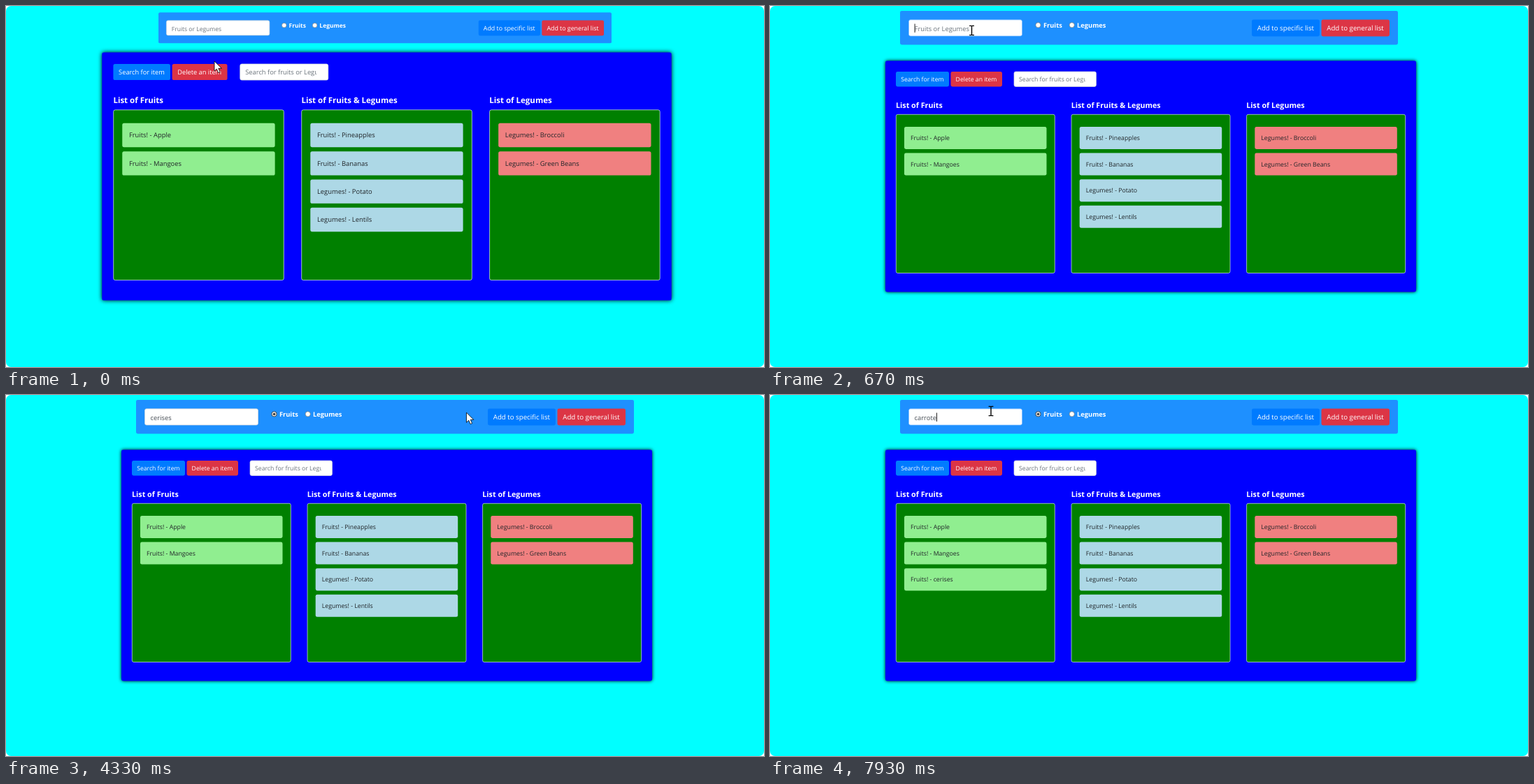
An HTML page for the animation above (8 s loop, 1084 by 517 pixels).

```html
<!DOCTYPE html>
<html lang="en">
<head>
<meta charset="utf-8">
<title>Fruit and legume lists</title>
<style>
  html, body { margin: 0; width: 100%; height: 100%; overflow: hidden; background: #fff; }
  svg { display: block; width: 100vw; height: 100vh; }
  text { font-family: "Open Sans", "Noto Sans", sans-serif; text-rendering: geometricPrecision; white-space: pre; }
</style>
</head>
<body>
<svg id="stage" viewBox="0 0 1084 517">
  <defs>
    <filter id="blur" x="-10%" y="-10%" width="120%" height="120%"><feGaussianBlur stdDeviation="2.9"/></filter>
    <clipPath id="searchClip"><rect x="349" y="94" width="102" height="22"/></clipPath>
  </defs>
  <rect width="1084" height="517" rx="7" fill="#0ff"/>
  <g id="bar"></g>
  <g id="panel"></g>
  <g id="cursor">
    <path id="arrow" d="M0 0V14.2L3.3 11.2L5.7 16.6L8.1 15.5L5.8 10.3H10.3Z" fill="#fff" stroke="#000" stroke-width=".8"/>
    <path id="beam" d="M-3.4-6.6H-.9L0-6L.9-6.6H3.4M0-6V6M-3.4 6.6H-.9L0 6L.9 6.6H3.4" fill="none" stroke="#000" stroke-width="1.4"/>
    <path id="hand" d="M-1.4 1.2Q0-1 1.4 1.2V6L3.3 6.2L5.2 6.8L7 8V12L5.6 17H-2L-5.6 10.6Q-5-0 -4 8.6L-1.4 10.8Z" fill="#fff" stroke="#000" stroke-width=".9" stroke-linejoin="round"/>
  </g>
</svg>
<script>
const LOOP = 8000, FRAME = 200 / 3;
const $ = id => document.getElementById(id);

function add(parent, tag, attrs, content = '') {
  const el = document.createElementNS('http://www.w3.org/2000/svg', tag);
  for (const name in attrs) el.setAttribute(name, attrs[name]);
  el.textContent = content;
  parent.append(el);
  return el;
}
const box = (parent, x, y, width, height, fill, extra) =>
  add(parent, 'rect', { x, y, width, height, fill, rx: 2.4, ...extra });
const label = (parent, x, y, size, content, fill = '#fff', extra) =>
  add(parent, 'text', { x, y, 'font-size': size, fill, ...extra }, content);

const BLUE = '#007bff', RED = '#dc3545', HINT = '#6c757d';
const bold = { 'font-weight': 700 };
const fieldEdge = { stroke: '#ced4da', 'stroke-width': .7 };

// Entry bar
const bar = $('bar');
box(bar, 186, 7, 712, 48.5, '#1e90ff');
const field = box(bar, 198.5, 19.8, 162, 23.2, '#fff', fieldEdge);
const hint = label(bar, 206.6, 36, 9.4, 'Fruits or Legumes', HINT);
const entry = label(bar, 206.6, 36, 9.4, '', '#495057');
const caret = add(bar, 'rect', { y: 25.5, width: 1, height: 12.5, fill: '#222' });
const radio = (x, name) => {
  label(bar, x + 7.4, 30.8, 9.3, name, '#fff', bold);
  return add(bar, 'circle', { cx: x, cy: 27.3, r: 3.6, fill: '#fff', stroke: '#767676', 'stroke-width': .7 });
};
const fruitRadio = radio(383.5, 'Fruits');
radio(431.7, 'Legumes');
const dot = add(bar, 'circle', { cx: 383.5, cy: 27.3, r: 1.9, fill: '#444' });
const addButton = box(bar, 689, 19.5, 97, 24, BLUE);
label(bar, 696.8, 35, 9.7, 'Add to specific list');
box(bar, 788.5, 19.5, 97.5, 24, RED);
label(bar, 796.3, 35, 9.7, 'Add to general list');

// List panel
const panel = $('panel');
box(panel, 165, 78.5, 759, 331, '#000', { filter: 'url(#blur)' });
box(panel, 165, 78.5, 759, 331, '#00f');
box(panel, 180, 94, 76, 21.5, BLUE);
label(panel, 187.2, 108, 8.65, 'Search for item');
box(panel, 258.5, 94, 73.5, 21.5, RED);
label(panel, 265.6, 108, 8.65, 'Delete an item');
box(panel, 349, 94, 117.5, 21.5, '#fff', fieldEdge);
label(panel, 356, 108.3, 8.7, 'Search for fruits or Legumes', HINT, { 'clip-path': 'url(#searchClip)' });

function column(x, title, fill, items) {
  label(panel, x, 146, 10.72, title, '#fff', bold);
  box(panel, x + .3, 155.3, 227, 227.2, '#008000', { stroke: '#e4f2e4', 'stroke-width': .65 });
  return items.map((name, i) => {
    const item = add(panel, 'g', {}), y = 173 + 37.6 * i;
    box(item, x + 12, y, 203.5, 32, fill);
    label(item, x + 21, y + 19.2, 8.75, name, '#212529');
    return item;
  });
}
const fruits = column(180, 'List of Fruits', '#90ee90',
  ['Fruits! - Apple', 'Fruits! - Mangoes', 'Fruits! - cerises']);
column(430.7, 'List of Fruits & Legumes', '#add8e6',
  ['Fruits! - Pineapples', 'Fruits! - Bananas', 'Legumes! - Potato', 'Legumes! - Lentils']);
column(681.3, 'List of Legumes', '#f08080', ['Legumes! - Broccoli', 'Legumes! - Green Beans']);

// Timeline, in ms
const SUBMIT = 4870, REFOCUS = 6130;
const words = [
  { word: 'cerises', keys: [1200, 1400, 1600, 2470, 2530, 2730, 2870], end: SUBMIT },
  { word: 'carrote', keys: [7000, 7130, 7200, 7330, 7530, 7870, 7930], end: LOOP }
];
const caretOn = [[470, 1000], [1200, 2130], [2470, 3400], [REFOCUS, 6670], [7000, LOOP]];
const pointer = [
  [0, 298, 79, 'arrow'], [70, 296, 64, 'arrow'], [130, 291, 45, 'arrow'], [200, 289, 33, 'beam'],
  [330, 288.5, 34.5, 'beam'], [470, 288.5, 35, 'beam'], [3200, 288.5, 35, 'beam'],
  [3270, 302, 37, 'beam'], [3330, 335, 44, 'arrow'], [3400, 372, 38, 'arrow'],
  [3530, 409, 27, 'arrow'], [3600, 401, 26, 'arrow'], [4000, 401, 26, 'arrow'],
  [4130, 480, 16, 'arrow'], [4270, 610, 20, 'arrow'], [4400, 715, 31, 'hand'],
  [4470, 728, 36, 'hand'], [5330, 728, 36, 'hand'], [5400, 700, 41, 'hand'],
  [5470, 590, 42, 'arrow'], [5600, 380, 41, 'arrow'], [5730, 380, 41, 'arrow'],
  [5870, 350, 32, 'beam'], [6000, 325, 20, 'beam'], [6130, 316, 22, 'beam'],
  [6400, 316, 23, 'beam'], [LOOP, 316, 23, 'beam']
];

const within = (t, from, to) => t >= from && t < to;
const show = (el, on) => el.setAttribute('visibility', on ? 'visible' : 'hidden');

// CSS "ease": cubic-bezier(.25, .1, .25, 1)
function ease(x) {
  if (x <= 0 || x >= 1) return Math.max(0, Math.min(1, x));
  const curve = (s, a, b) => 3 * a * s * (1 - s) ** 2 + 3 * b * s * s * (1 - s) + s ** 3;
  let low = 0, high = 1;
  for (let i = 0; i < 20; i++) {
    const mid = (low + high) / 2;
    if (curve(mid, .25, .25) < x) low = mid; else high = mid;
  }
  return curve(low, .1, 1);
}

const zoom = (el, cx, cy, scale) =>
  el.setAttribute('transform', `translate(${cx} ${cy}) scale(${scale}) translate(${-cx} ${-cy})`);

function movePointer(t) {
  const i = Math.max(1, pointer.findIndex(p => p[0] > t));
  const [t0, x0, y0, kind] = pointer[i - 1], [t1, x1, y1] = pointer[i];
  const k = (t - t0) / (t1 - t0);
  $('cursor').setAttribute('transform', `translate(${x0 + (x1 - x0) * k} ${y0 + (y1 - y0) * k})`);
  for (const name of ['arrow', 'beam', 'hand']) show($(name), name === kind);
}

function render(time) {
  const t = Math.round(Math.floor((time + 4) / FRAME) * FRAME / 10) * 10;

  zoom(bar, 542, 31.25, .91 + .09 * ease((t - 128) / 520));
  zoom(panel, 544.5, 244, 1.073 - .073 * ease((t - 121) / 495));

  const active = words.find(w => within(t, w.keys[0], w.end));
  entry.textContent = active ? active.word.slice(0, active.keys.filter(k => k <= t).length) : '';
  show(hint, !active);
  show(caret, caretOn.some(([from, to]) => within(t, from, to)));
  caret.setAttribute('x', 206.6 + (active ? entry.getComputedTextLength() : 0));

  const focused = within(t, 470, 3600) || t >= REFOCUS;
  field.setAttribute('stroke', focused ? '#80bdff' : '#ced4da');
  const checked = t >= 3730;
  show(dot, checked);
  fruitRadio.setAttribute('stroke', checked ? '#444' : '#767676');
  fruitRadio.setAttribute('stroke-width', checked ? 1 : .7);
  addButton.setAttribute('fill', within(t, 4400, REFOCUS) ? '#0069d9' : BLUE);
  show(fruits[2], t >= SUBMIT);
  movePointer(t);
}

const start = performance.now();
function tick() {
  render((performance.now() - start) % LOOP);
  requestAnimationFrame(tick);
}
tick();
</script>
</body>
</html>
```
